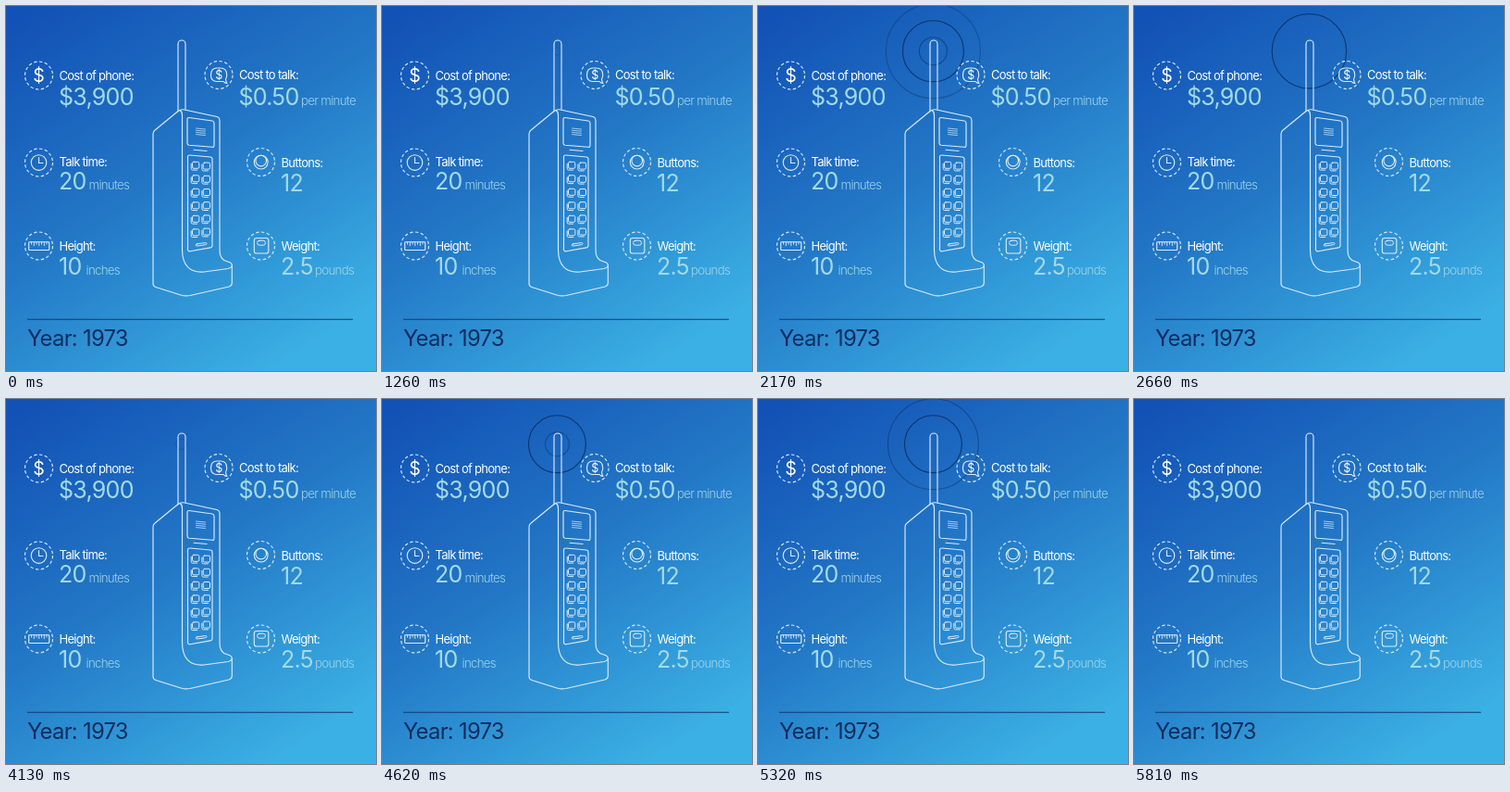
Recreate the animation shown at these times as an HTML page. Size 400 by 394 pixels, loop 6300 ms.

```html
<!DOCTYPE html>
<html lang="en">
<head>
<meta charset="utf-8">
<title>Mobile phone, 1973</title>
<style>
  html, body { margin: 0; width: 100%; height: 100%; overflow: hidden; background: #2377c5; }
  svg { display: block; width: 100%; height: 100%; font-family: Inter, "Open Sans", sans-serif; letter-spacing: -.045em; }
  .line { fill: none; stroke: #d9eaf8; stroke-width: 1.15; stroke-linecap: round; stroke-linejoin: round; }
  .thin { stroke-width: .7; }
  .dash { stroke-dasharray: 3.4 2.49; stroke-linecap: butt; }
  .label { fill: #fff; font-size: 13px; }
  .value { fill: #a3dae6; font-size: 25px; }
  .unit { fill: #9dd3e8; font-size: 13.3px; font-weight: 300; }
  .year { fill: #0d2d60; font-size: 23.8px; }
  .dollar { fill: #fff; text-anchor: middle; letter-spacing: 0; }
  .ring { fill: none; stroke: #0b2c5e; stroke-width: 1.1; }
</style>
</head>
<body>
<svg viewBox="0 0 400 394" preserveAspectRatio="none">
  <defs>
    <linearGradient id="sky" gradientUnits="userSpaceOnUse" x1="9" y1="14" x2="261" y2="409">
      <stop offset="0" stop-color="#1251b5"/>
      <stop offset=".5" stop-color="#2378c6"/>
      <stop offset="1" stop-color="#3bb0e4"/>
    </linearGradient>
  </defs>
  <rect width="400" height="394" fill="url(#sky)"/>
  <g id="rings"></g>

  <g class="line">
    <path d="M186 114V41a4 4 0 0 1 8 0V111.500"/>
    <path d="M159 138Q159 135.500 161 134L186 113.500Q189 111 193 112L228 119.500Q231 120.300 231 124V264Q231 273.500 238.500 275.500L242 276.700Q244.300 277.700 244.300 280V299Q244.300 302 241 303L199 312.500Q194 313.500 189 312L162 303.500Q159 302.500 159 299.500Z"/>
    <path d="M188 112.500Q190.500 114 190.500 118V263C190.500 280 199 288.500 214 287L240 283.500Q244 282.500 244.300 280"/>
    <path d="M198 120.500L223 124Q225 124.300 225 126.500V150.500Q225 152.500 223 152.300L198 150.300Q196 150 196 148V122.500Q196 120.300 198 120.500Z"/>
    <path class="thin" d="M205.500 132l10 1m-10 1.200l10 1m-10 1.200l10 1m-10 1.200l10 1"/>
    <path d="M203 155.300L217 156.500"/>
    <path d="M199 161L221 163Q223 163.200 223 165V258.500Q223 260.500 221 260.900L199 264.800Q196.500 265 196.500 262.500V163Q196.500 160.800 199 161Z"/>
    <path d="M206.500 256.800l9-1.200q1.500 0 1.500 1q0 .900-1.500 1.200l-9 1.200q-1.300 0-1.300-1q0-1 1.300-1.200z" stroke-width="1"/>
    <g id="keys" stroke-width="1"></g>
  </g>

  <g id="facts"></g>

  <g class="line">
    <path d="M235 81.500H228Q221.500 81.500 221.500 74.500Q221.500 67 228 67H232Q238.700 67 238.700 74.500Q238.700 77 237.500 79Q237.500 81.500 239 83.500Q236.500 83.500 235 81.500Z"/>
    <circle cx="35.500" cy="169" r="8.300"/>
    <path d="M35.500 163.500V169.500H40"/>
    <circle cx="275.700" cy="168.600" r="7.400"/>
    <circle cx="275.700" cy="167" r="5.800"/>
    <rect x="24.700" y="254.700" width="22" height="8.800" rx=".8"/>
    <path id="ticks" stroke-width=".9"/>
    <rect x="268.300" y="250.500" width="15.500" height="16.500" rx="2.500"/>
    <rect x="271.700" y="253.200" width="8.700" height="5" rx="2.300" stroke-width="1"/>
  </g>
  <text class="dollar" x="35.500" y="82" font-size="19.500">$</text>
  <text class="dollar" x="230.200" y="78.800" font-size="12.500">$</text>

  <path d="M23 338.300H375" stroke="#12396f" stroke-width="1.100"/>
  <text class="year" x="23" y="367">Year: 1973</text>
</svg>
<script>
const $ = id => document.getElementById(id);

// icon x, icon y, text x, label, label y, value, value y, unit, unit x
const facts = [
  [35.5, 75, 57.5, "Cost of phone:", 80.3, "$3,900", 107, "", 0],
  [230, 74.5, 252, "Cost to talk:", 79.3, "$0.50", 107, "per minute", 319],
  [35.5, 169, 57.5, "Talk time:", 173, "20", 198, "minutes", 89.5],
  [275.5, 168.5, 297.5, "Buttons:", 173.5, "12", 199.5, "", 0],
  [35.5, 259, 57.5, "Height:", 263.5, "10", 290, "inches", 86.5],
  [275.5, 259, 297.5, "Weight:", 263.5, "2.5", 290, "pounds", 334]
];
$("facts").innerHTML = facts.map(([cx, cy, x, label, ly, value, vy, unit, ux]) => `
  <circle class="line dash" cx="${cx}" cy="${cy}" r="15"/>
  <text class="label" x="${x}" y="${ly}">${label}</text>
  <text class="value" x="${x - .5}" y="${vy}">${value}</text>
  <text class="unit" x="${ux}" y="${vy}">${unit}</text>`).join("");

let keys = "";
for (let row = 0; row < 6; row++) {
  for (let col = 0; col < 2; col++) {
    const x = 201.5 + col * 11.7, y = 168.3 + row * 14.5 + col * (.8 - row * .3);
    keys += `<rect x="${x}" y="${y}" width="7.300" height="7" rx="1.500"/>
      <path d="M${x - 1.3} ${y + 2}v5.300q0 1.500 1.500 1.500h5"/>`;
  }
}
$("keys").innerHTML = keys;

let ticks = "";
for (let i = 0; i < 7; i++) ticks += `M${27.5 + i * 2.75} 254.7v${i % 2 ? 4 : 2.5}`;
$("ticks").setAttribute("d", ticks);

const LOOP = 6300, STEP = 70, SPEED = .0514, MAX_RADIUS = 52.5;
const pulses = [1178, 4018], RING_GAP = 350;
const births = pulses.flatMap(p => [0, 1, 2].map(i => p + i * RING_GAP));
const rings = births.map(() => {
  const ring = document.createElementNS("http://www.w3.org/2000/svg", "circle");
  ring.setAttribute("class", "ring");
  ring.setAttribute("cx", 189.4);
  ring.setAttribute("cy", 48.7);
  $("rings").append(ring);
  return ring;
});

function draw(time) {
  const t = Math.floor(time % LOOP / STEP) * STEP;
  rings.forEach((ring, i) => {
    const radius = (t - births[i]) * SPEED;
    const visible = radius > 0 && radius < MAX_RADIUS;
    const fade = Math.min(1, radius / 24, (60 - radius) / 20);
    ring.setAttribute("r", visible ? radius : 0);
    ring.setAttribute("opacity", visible ? fade * .85 : 0);
  });
}

const start = performance.now();
function tick() {
  draw(performance.now() - start);
  requestAnimationFrame(tick);
}
tick();
</script>
</body>
</html>
```
